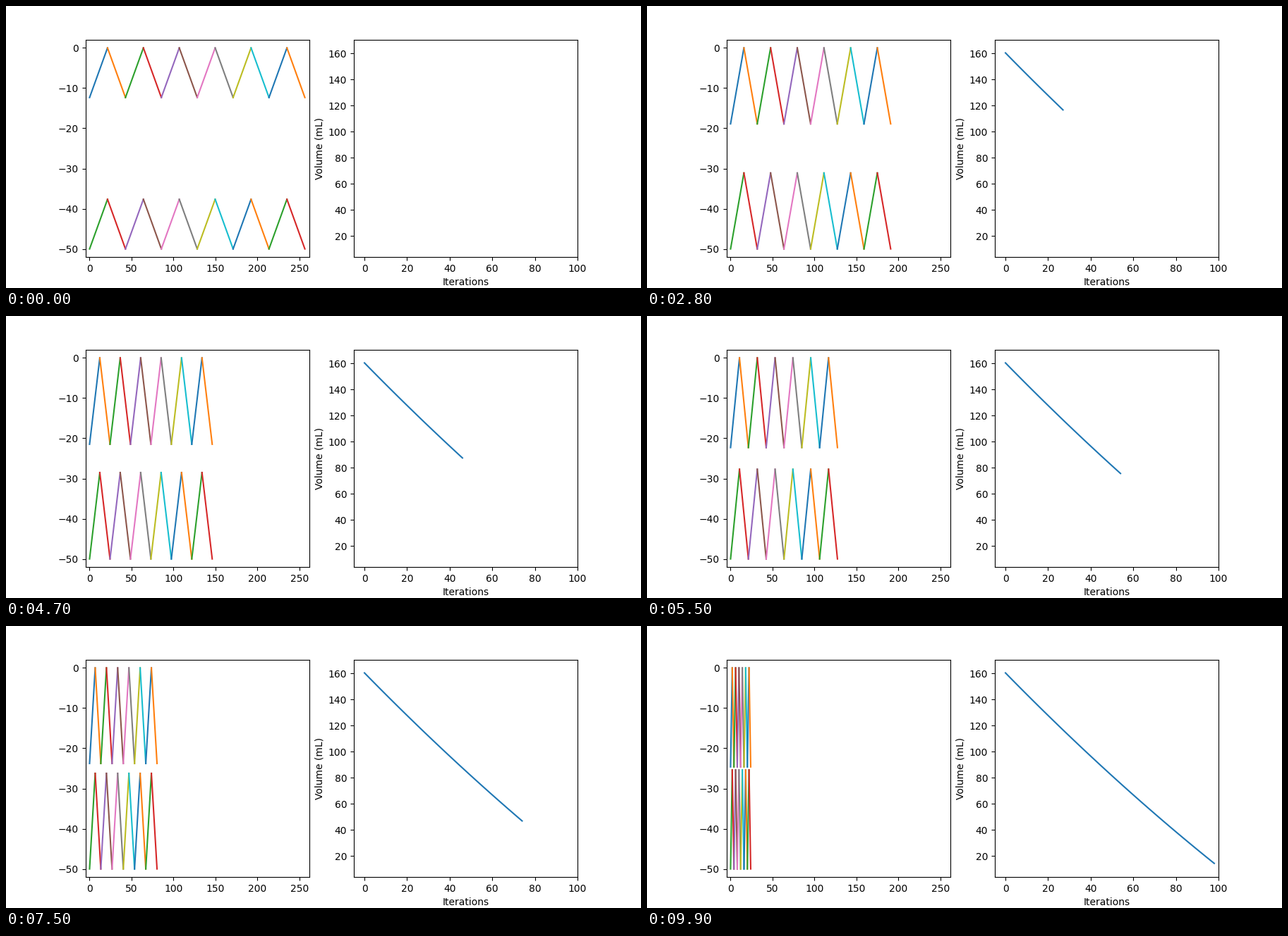
A matplotlib script that plays this animation: 900x400 px, repeating every 10 s.

```python
import numpy as np
import matplotlib.pyplot as plt
from matplotlib.animation import FuncAnimation

FRAMES = 100
FOLDS = 12          # slanted walls along the bellows
WALL = 24.7         # length of one wall
DIAMETER = 50

steps = np.linspace(WALL * np.cos(np.pi / 6), 2, FRAMES)
iters = np.arange(FRAMES)
volume = 160.4 - 1.667 * iters + 0.00181 * iters**2

fig, (side, graph) = plt.subplots(1, 2, figsize=(9, 4), dpi=100)

side.set_xlim(-5, FOLDS * steps[0] + 5)
side.set_ylim(-DIAMETER - 2, 2)
graph.set_xlim(-5, 100)
graph.set_ylim(4.0, 170.4)
graph.set_xlabel("Iterations")
graph.set_ylabel("Volume (mL)")

walls = [side.plot([], [], color=f"C{i % 10}")[0] for i in range(2 * FOLDS)]
curve, = graph.plot([], [], color="C0")


def draw(n):
    step = steps[n]
    depth = np.sqrt(WALL**2 - step**2)
    for i, wall in enumerate(walls):
        row, k = divmod(i, FOLDS)
        low = -DIAMETER if row else -depth
        ends = [low, low + depth]
        wall.set_data([k * step, (k + 1) * step], ends[::-1] if k % 2 else ends)
    curve.set_data(iters[:n], volume[:n])
    return [*walls, curve]


anim = FuncAnimation(fig, draw, frames=FRAMES, interval=100,
                     repeat=True, repeat_delay=0, blit=False)
plt.show()
```
